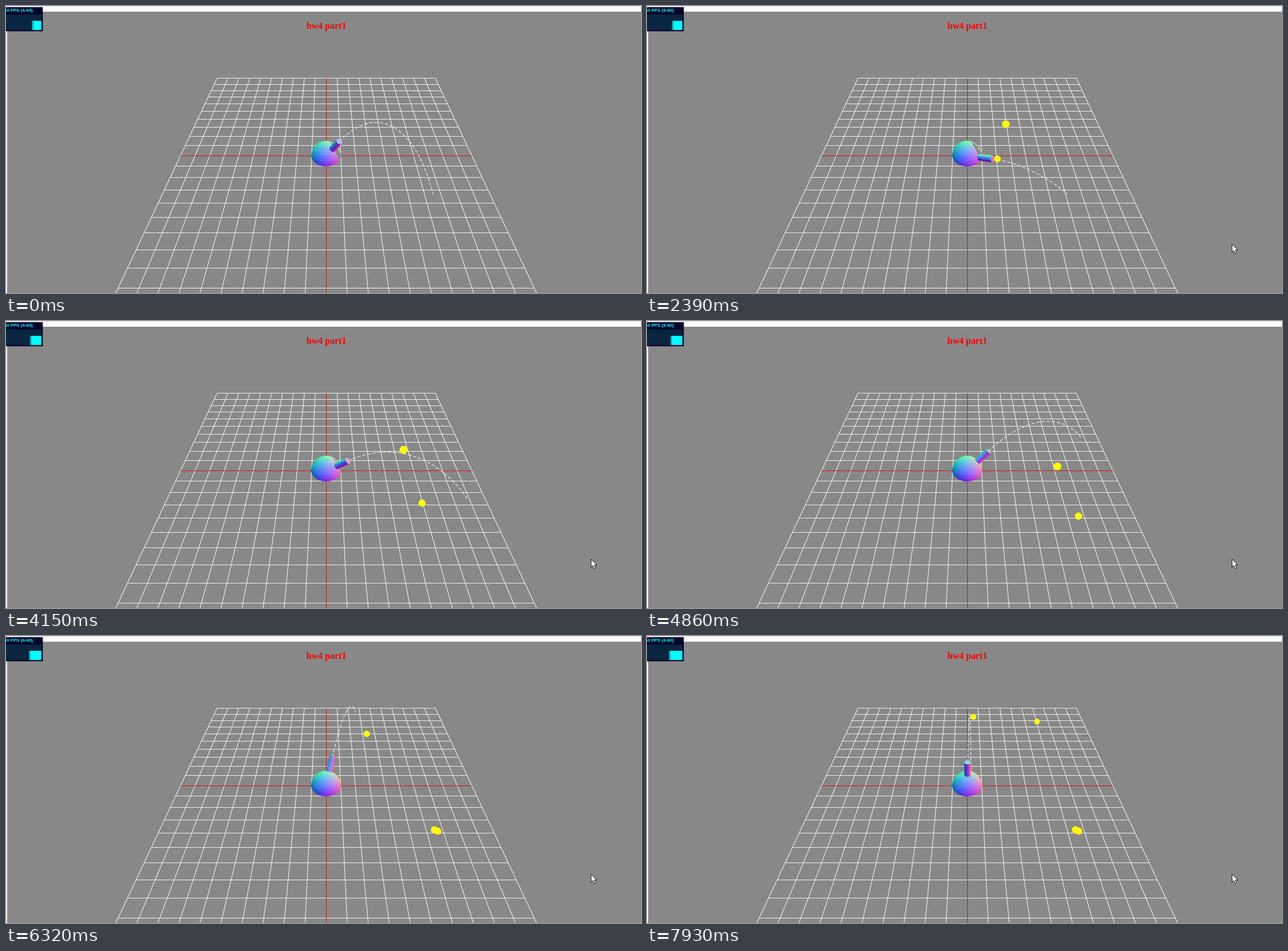
Recreate the animation shown at these times as an HTML page with a canvas. Size 1113 by 503 pixels, loop 8000 ms.

```html
<!DOCTYPE html>
<html lang="en">
<head>
<meta charset="utf-8">
<title>Cannon</title>
<style>
html, body { margin: 0; width: 100%; height: 100%; overflow: hidden; background: #fff; }
canvas { display: block; }
</style>
</head>
<body>
<canvas id="stage" width="1113" height="503"></canvas>
<script>
const ctx = document.getElementById('stage').getContext('2d');
const LOOP = 8000, FIRST_STEP = 1290, STEP = 77.14;
const BACKGROUND = '#888888';
const CENTER = [561.2, 262.2], FOCAL = 541.5, H = Math.SQRT1_2;
const CAMERA = [0, 150, 150];
const BARREL = 20, BORE = 2, DOME = 10, BALL = 2.25;
const SPEED = 2.037, GRAVITY = 0.0618;   // units per step

// [step, azimuth, elevation] in degrees
const AIM = [[0, 30, 61], [3, 30, 46], [8, 30, 20.5], [13, 30, 20.5], [21, 28, 3.5],
  [25, 28, 3.5], [32, 21, 25], [37, 18, 42.5], [51, -42, 40.5], [59, -42, 41],
  [67, -84, 41], [73, -84, 41], [86, -75, 86.5]];
// [fired at step, azimuth, elevation]
const SHOTS = [[-2, 30, 61], [12.1, 30, 20.5], [50.8, -42, 40], [67.7, -84, 41]];
const POINTER = [[150, 1064, 488], [220, 1044, 452], [300, 1020, 414], [370, 1014, 406], [440, 1025, 417]];

const rad = deg => deg * Math.PI / 180;
const dot = (a, b) => a[0] * b[0] + a[1] * b[1] + a[2] * b[2];
const combine = (a, s, b) => a.map((v, i) => v + s * b[i]);

function project([x, y, z]) {
  const scale = FOCAL / (CAMERA[1] / H - H * (y + z));
  return [CENTER[0] + x * scale, CENTER[1] - H * (y - z) * scale, scale];
}

const viewNormal = ([x, y, z]) => [x, H * (y - z), H * (y + z)];
const normalColor = n => `rgb(${viewNormal(n).map(v => Math.round(127.5 + 127.5 * v))})`;
const facesCamera = (p, n) => dot(combine(CAMERA, -1, p), n) > 0;

function path(points, close) {
  ctx.beginPath();
  for (const [x, y] of points) ctx.lineTo(x, y);
  if (close) ctx.closePath();
}

function fillFace(points, color) {
  path(points.map(project), true);
  ctx.fillStyle = ctx.strokeStyle = color;
  ctx.lineWidth = 0.6;
  ctx.fill();
  ctx.stroke();
}

function interpolate(keys, at) {
  if (at <= keys[0][0]) return keys[0].slice(1);
  for (let i = 1; i < keys.length; i++) {
    const a = keys[i - 1], b = keys[i];
    if (at <= b[0]) {
      const k = (at - a[0]) / (b[0] - a[0]);
      return [a[1] + k * (b[1] - a[1]), a[2] + k * (b[2] - a[2])];
    }
  }
  return keys[keys.length - 1].slice(1);
}

function direction(azimuth, elevation) {
  const a = rad(azimuth), e = rad(elevation);
  return [Math.cos(e) * Math.cos(a), Math.sin(e), Math.cos(e) * Math.sin(a)];
}

function flightTime(dir) {
  const vy = SPEED * dir[1];
  return (vy + Math.sqrt(vy * vy + 2 * GRAVITY * BARREL * dir[1])) / GRAVITY;
}

function flightPoint(dir, time) {
  const p = dir.map(v => v * (BARREL + SPEED * time));
  p[1] -= GRAVITY * time * time / 2;
  return p;
}

function drawGrid() {
  const line = (a, b, color, width) => {
    path([a, b]);
    ctx.strokeStyle = color;
    ctx.lineWidth = width;
    ctx.stroke();
  };
  for (const center of [false, true]) {
    for (let i = -10; i <= 10; i++) {
      if ((i === 0) !== center) continue;
      const c = i * 10;
      const left = project([-100, 0, c]), right = project([100, 0, c]);
      const y = Math.floor(left[1]) + 0.5;
      line([left[0], y], [right[0], y], center ? '#dc1414' : '#f0f0f0', 1);
      const far = project([c, 0, -100]), near = project([c, 0, 100]);
      if (center) far[0] = near[0] = 561.5;
      line(far, near, center ? '#b42318' : '#f0f0f0', center ? 1 : 1.1);
    }
  }
}

function drawTrajectory(dir) {
  const end = Math.max(0, flightTime(dir) - 1.8), points = [];
  for (let i = 0; i <= 60; i++) points.push(project(flightPoint(dir, end * i / 60)));
  path(points);
  ctx.strokeStyle = '#f4f4f4';
  ctx.lineWidth = 1.1;
  ctx.setLineDash([6, 3]);
  ctx.stroke();
  ctx.setLineDash([]);
}

// The pale right-hand side blends into the background at first, then fills in.
function domeColor(normal, limit) {
  const [x, y, z] = viewNormal(normal);
  if (x + 0.5 * y < limit) return normalColor(normal);
  return z < 0.45 && y > 0.25 ? '#bdb5a8' : BACKGROUND;
}

function drawDome(step) {
  const limit = step < 12 ? 0.69 : step < 30 ? 0.74 : step < 45 ? 0.9 : 9;
  const rings = step < 14 ? 8 : 16, sectors = rings * 4;
  const unit = (i, j) => direction(360 * j / sectors, 90 * i / rings);
  for (let i = 0; i < rings; i++) {
    for (let j = 0; j < sectors; j++) {
      const normal = unit(i + 0.5, j + 0.5);
      if (!facesCamera(normal.map(v => v * DOME), normal)) continue;
      const corners = [unit(i, j), unit(i, j + 1), unit(i + 1, j + 1), unit(i + 1, j)];
      fillFace(corners.map(c => c.map(v => v * DOME)), domeColor(normal, limit));
    }
  }
}

function drawBarrel(azimuth, elevation) {
  const dir = direction(azimuth, elevation);
  const up = direction(azimuth, elevation + 90), side = direction(azimuth + 90, 0);
  const around = i => {
    const a = rad(i * 15);
    return up.map((v, k) => v * Math.cos(a) + side[k] * Math.sin(a));
  };
  const rim = (i, length) => combine(dir.map(v => v * length), BORE, around(i));
  const cap = [];
  for (let i = 0; i < 24; i++) {
    const normal = around(i + 0.5);
    cap.push(rim(i, BARREL));
    if (facesCamera(rim(i + 0.5, 15), normal))
      fillFace([rim(i, 9.7), rim(i + 1, 9.7), rim(i + 1, BARREL), rim(i, BARREL)], normalColor(normal));
  }
  if (facesCamera(dir.map(v => v * BARREL), dir)) fillFace(cap, normalColor(dir));
}

function drawBalls(step) {
  if (step < 0) return;
  for (const [fired, azimuth, elevation] of SHOTS) {
    if (step < fired) continue;
    const dir = direction(azimuth, elevation);
    const [x, y, scale] = project(flightPoint(dir, Math.min(step - fired, flightTime(dir))));
    const corners = [];
    for (let i = 0; i < 8; i++) {
      const a = rad(i * 45 + 22.5);
      corners.push([x + BALL * scale * Math.cos(a), y + BALL * scale * Math.sin(a)]);
    }
    path(corners, true);
    ctx.fillStyle = '#ffff00';
    ctx.fill();
  }
}

function drawStats(t) {
  const rect = (color, x, y, w, h) => { ctx.fillStyle = color; ctx.fillRect(x, y, w, h); };
  rect('#05052a', 0, 2, 64.5, 42.3);
  rect('#0a2540', 0, 15, 62, 27);
  const left = 46 - 0.89 * Math.floor((t + 330) / 1000);
  rect('#00ffff', left, 26, 62 - left, 16);
  rect('#0a6070', left + 1, 26, 0.8, 16);
  ctx.fillStyle = '#00ffff';
  ctx.font = 'bold 8px "Liberation Sans", Arial, sans-serif';
  ctx.textAlign = 'right';
  ctx.fillText('60 FPS (4-60)', 47, 10);
}

function drawPointer(t) {
  const key = POINTER.filter(k => k[0] <= t).pop();
  if (!key) return;
  const shape = [[0, 0], [0, 14], [3, 11], [5.5, 16.5], [8, 15.4], [5.7, 10.2], [9.8, 10]];
  path(shape.map(([x, y]) => [key[1] + 0.5 + x, key[2] + 0.5 + y]), true);
  ctx.fillStyle = '#fff';
  ctx.strokeStyle = '#111';
  ctx.lineWidth = 1;
  ctx.fill();
  ctx.stroke();
}

function draw(t) {
  const step = Math.floor((t - FIRST_STEP) / STEP);
  const aim = interpolate(AIM, step);
  ctx.fillStyle = '#fafafa';
  ctx.fillRect(0, 0, 1113, 503);
  ctx.fillStyle = '#d8d8d8';
  ctx.fillRect(0, 0, 1113, 1);
  ctx.fillStyle = BACKGROUND;
  ctx.fillRect(2, 10, 1111, 493);
  drawGrid();
  drawTrajectory(direction(...aim));
  drawDome(step);
  drawBarrel(...aim);
  drawBalls(step);
  ctx.fillStyle = '#ff0000';
  ctx.font = 'bold 16px "Liberation Serif", "Times New Roman", serif';
  ctx.textAlign = 'center';
  ctx.fillText('hw4 part1', 561.5, 40);
  drawStats(t);
  drawPointer(t);
}

function tick() {
  draw(performance.now() % LOOP);
  requestAnimationFrame(tick);
}
tick();
</script>
</body>
</html>
```
